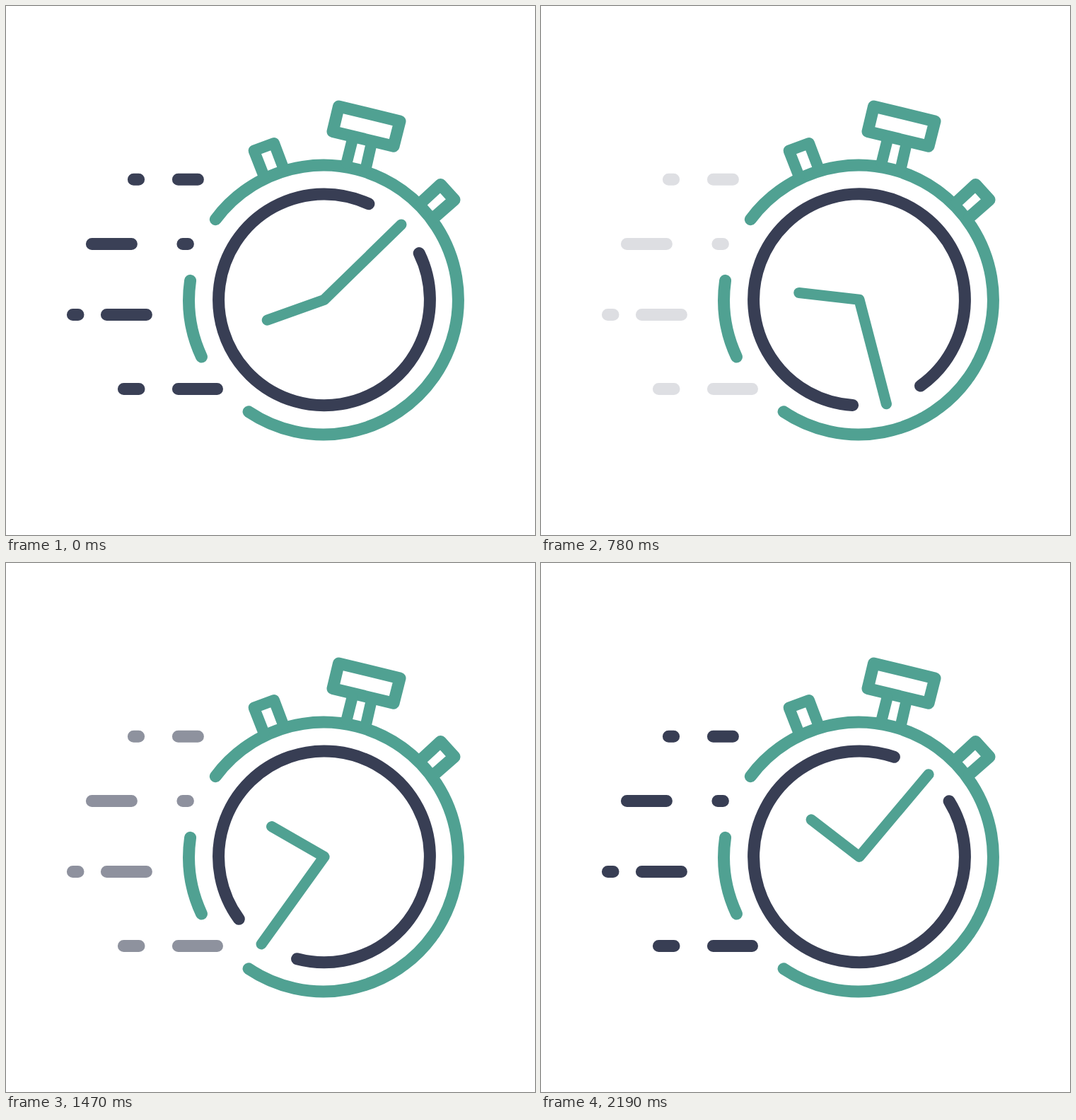
An HTML page that plays this animation: 748x748 px, repeating every 4760 ms.

```html
<!DOCTYPE html>
<html lang="en">
<head>
<meta charset="utf-8">
<title>Stopwatch</title>
<style>
  html, body { margin: 0; width: 100%; height: 100%; overflow: hidden; background: #fff; }
  svg { display: block; width: 100vw; height: 100vh; }
  path { fill: none; stroke-width: 17; stroke-linecap: round; stroke-linejoin: round; }
  .green { stroke: #50a192; }
  .dark { stroke: #383e54; }
  .slim { stroke-width: 16; }
  #hands { stroke-width: 15.2; }
</style>
</head>
<body>
<svg viewBox="0 0 748 748">
  <g id="dashes" class="dark">
    <path d="M180.4 245.2H187.6M243.4 245.2H271.4"/>
    <path d="M121.4 336.6H177.4M249.9 336.6H257.4"/>
    <path d="M94.4 436.4H102M142.4 436.4H198.4"/>
    <path d="M166.4 541.5H188M243.4 541.5H298.5"/>
  </g>
  <path id="case" class="green"/>
  <path class="green slim" d="M364.5 240L350.6 204.5L379 194.1L391.8 228"/>
  <path class="green" d="M470.5 142L557 163L548 198.3L462 177.5Z"/>
  <path class="green slim" stroke-linecap="butt" d="M489.6 190L481.6 222M516.4 196L508.9 229"/>
  <path class="green" d="M588 277L614.5 252.5L634 274L606 298.5"/>
  <path id="dial" class="dark"/>
  <path id="hands" class="green"/>
</svg>
<script>
const LOOP = 4760, STEP = 30, BRAKE = 55, LAST = 73;
const DIAL = { x: 450, y: 415.3, r: 149.4 };
const CASE = { x: 449, y: 415.5, r: 190.4 };
const MINUTE = { start: 45.7, speed: 18.24, sway: 5.5, end: 1120.1 };
const HOUR = { start: 250.3, speed: 1.01, sway: 0, end: 307.7 };

const el = id => document.getElementById(id);

function polar(c, deg, r = c.r) {
  const a = deg * Math.PI / 180;
  return `${(c.x + r * Math.sin(a)).toFixed(2)} ${(c.y - r * Math.cos(a)).toFixed(2)}`;
}

function arc(c, from, to) {
  const large = to - from > 180 ? 1 : 0;
  return `M${polar(c, from)}A${c.r} ${c.r} 0 ${large} 1 ${polar(c, to)}`;
}

// Steady turning with a slight sway, then easing out to the resting angle
function angle(hand, step) {
  const s = Math.min(step, BRAKE);
  const turning = hand.start + hand.speed * s - hand.sway * Math.sin(2 * Math.PI * s / 35.5);
  const left = (LAST - Math.max(step, BRAKE)) / (LAST - BRAKE);
  return hand.end + (turning - hand.end) * left ** 4.7;
}

// The dashes fade twice: one long dip, one short
const dip = (step, middle, width, depth) => 1 - depth * Math.exp(-(((step - middle) / width) ** 2));
const fade = step => dip(step, 30.5, 14.5, .92) * dip(step, 56, 7, .84);

el('case').setAttribute('d', arc(CASE, -53.3, 213.8) + arc(CASE, 245, 278.2));

function draw(time) {
  const step = Math.min(LAST, Math.floor(time % LOOP / STEP));
  const minute = angle(MINUTE, step), hour = angle(HOUR, step);
  const gap = minute - 1.3;
  el('dial').setAttribute('d', arc(DIAL, gap + 19.5, gap + 340.5));
  el('hands').setAttribute('d',
    `M${polar(DIAL, minute, 152.2)}L${DIAL.x} ${DIAL.y}L${polar(DIAL, hour, 85.7)}`);
  el('dashes').style.opacity = fade(step);
}

const start = performance.now();
function tick() {
  draw(performance.now() - start);
  requestAnimationFrame(tick);
}
tick();
</script>
</body>
</html>
```
